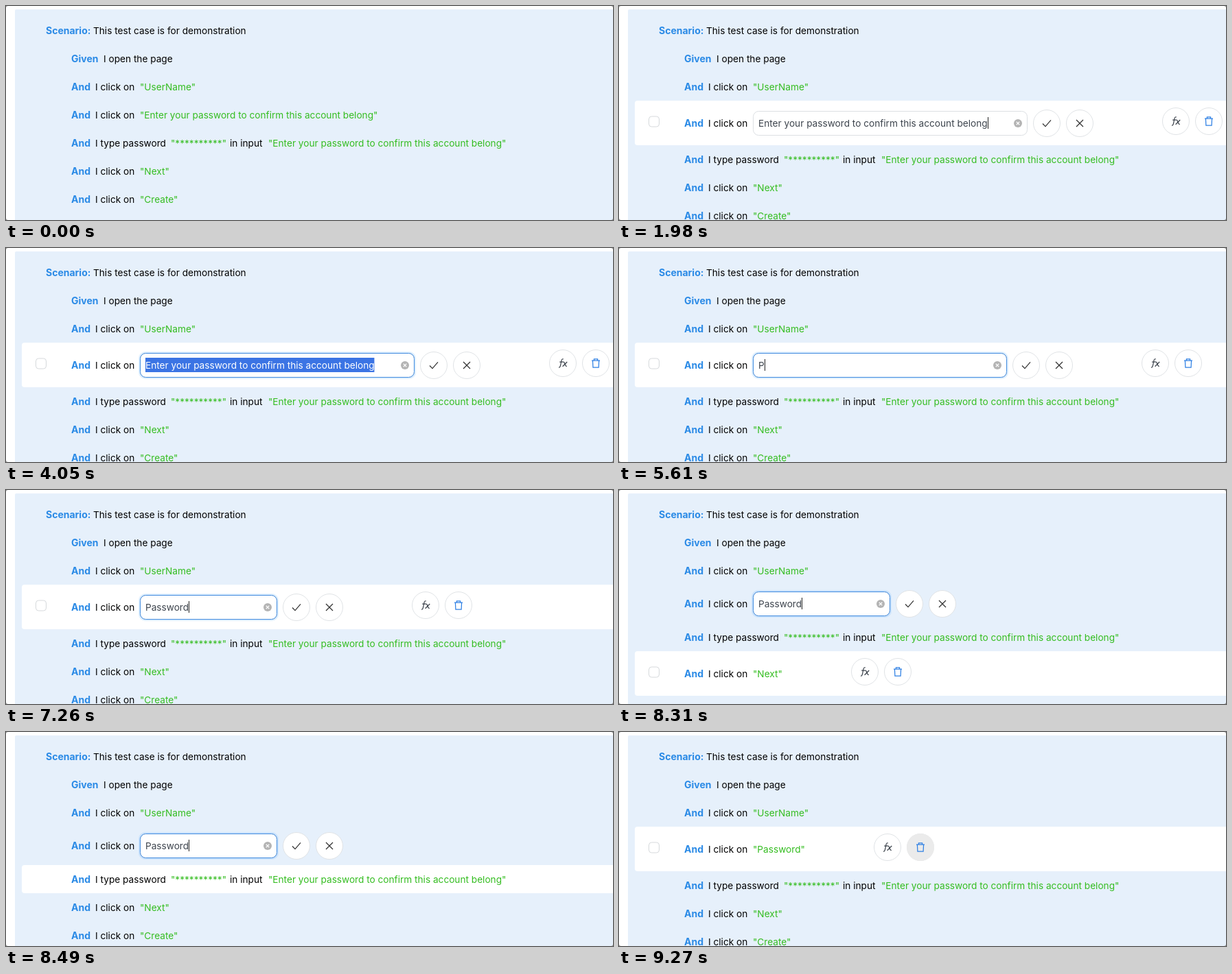
An HTML page with a canvas that plays this animation: 884x312 px, repeating every 9.36 s.

```html
<!DOCTYPE html>
<html lang="en">
<head>
<meta charset="utf-8">
<title>Editing a test step</title>
<style>
  html, body { margin: 0; width: 100%; height: 100%; overflow: hidden; background: #fff; }
  canvas { display: block; }
</style>
</head>
<body>
<canvas id="stage" width="884" height="312"></canvas>
<script>
const W = 884, H = 312, LOOP = 9360, TICK = 30;
const ctx = document.getElementById('stage').getContext('2d');

const REGULAR = '400 13.65px Inter, sans-serif';
const BOLD = '700 14px Inter, sans-serif';
const BLUE = '#2a8ae6', GREEN = '#34bd20', INK = '#3d444d', LINE = '#e0e3e6';
const LONG = 'Enter your password to confirm this account belong';
const ROW_TOP = 56, ROW_H = 41, EDIT_H = 56, TALL_H = 65;

// Each step: keyword, then pairs of x and text; quoted text is green.
const rows = [
  ['Given', [142, 'I open the page']],
  ['And', [130, 'I click on'], [195, '"UserName"']],
  ['And', [130, 'I click on'], [195, `"${LONG}"`]],
  ['And', [130, 'I type password'], [240, '"**********"'], [326, 'in input'], [382, `"${LONG}"`]],
  ['And', [130, 'I click on'], [195, '"Next"']],
  ['And', [130, 'I click on'], [195, '"Create"']],
];
const EDIT_ROW = 2;

const EDIT_START = 1980, BLUR = 8790, EDIT_END = 8970;
// [time, hovered row, expanded with its buttons]
const hovers = [
  [0, -1, false], [840, 2, false], [870, 2, true],
  [8190, 3, false], [8220, 3, true], [8280, 4, false], [8310, 4, true],
  [8490, 3, false], [8520, 3, true], [8580, 2, false], [8610, 2, true],
  [EDIT_END, 2, false], [EDIT_END + TICK, 2, true],
];
// [time, first selected character]
const selections = [
  [0, 50], [3150, 48], [3180, 44], [3210, 39], [3240, 33], [3270, 27],
  [3300, 22], [3330, 20], [3360, 19],
];
const keyTimes = [5610, 5880, 6300, 6420, 6630, 6840, 7080, 7260];

const icons = {
  check: 'M-6 .5L-2 4.6L6 -4.6',
  cross: 'M-5 -5L5 5M5 -5L-5 5',
  fx: 'M-6 6C-4 6.6 -3.6 4 -3 1L-2.2 -3.2C-1.7 -6 -.6 -6.6 .8 -6M-4.8 -2H.8' +
      'M.8 -1.8C3 -2.6 3.2 5.4 5.8 4.4M6.2 -2L-.4 4.8',
  trash: 'M-6 -4H6M-2.6 -4V-6.2H2.6V-4M-4.6 -4L-4.1 6H4.1L4.6 -4',
};
for (const name in icons) icons[name] = new Path2D(icons[name]);

const progress = (t, from, to) => Math.min(1, Math.max(0, (t - from) / (to - from)));
const smooth = p => p * p * (3 - 2 * p);
const latest = (list, t) => list.filter(entry => entry[0] <= t).pop();

function text(str, x, y, color, font = REGULAR) {
  ctx.font = font;
  ctx.fillStyle = color;
  ctx.fillText(str, x, y + 5);
}

function textWidth(str) {
  ctx.font = REGULAR;
  return ctx.measureText(str).width;
}

function box(x, y, w, h, radius, fill, stroke, lineWidth = 1) {
  ctx.beginPath();
  ctx.roundRect(x, y, w, h, radius);
  if (fill) { ctx.fillStyle = fill; ctx.fill(); }
  if (stroke) { ctx.strokeStyle = stroke; ctx.lineWidth = lineWidth; ctx.stroke(); }
}

function icon(name, x, y, color, lineWidth = 1.25) {
  ctx.save();
  ctx.translate(x, y);
  ctx.strokeStyle = color;
  ctx.lineWidth = lineWidth;
  ctx.stroke(icons[name]);
  ctx.restore();
}

function roundButton(name, x, y, color, grey = 0) {
  box(x - 19.5, y - 19.5, 39, 39, 19.5, '#fff', LINE);
  if (grey) box(x - 20, y - 20, 40, 40, 20, `rgba(235, 235, 235, ${grey})`);
  icon(name, x, y, color);
}

function typedText(t) {
  const count = keyTimes.filter(k => k <= t).length;
  return count ? 'Password'.slice(0, count) : LONG;
}

function selectionStart(t) {
  if (t >= keyTimes[0]) return LONG.length;
  if (t >= 3540) return Math.round(18 * (1 - smooth(progress(t, 3540, 4080))));
  return latest(selections, t)[1];
}

function caretVisible(t) {
  const lastInput = [EDIT_START, ...keyTimes].filter(k => k <= t).pop();
  return t < BLUR && Math.floor((t - lastInput) / 450) % 2 === 0;
}

// Draws the input with its two buttons and returns the right edge.
function drawEditor(t, y) {
  const x = 195, textX = 203;
  const width = Math.round(400 - 200 * smooth(progress(t, 5581, 5700)));
  const focus = progress(t, EDIT_START, 2250) * (1 - progress(t, BLUR, EDIT_END));
  const right = x + width, value = typedText(t), start = selectionStart(t);

  if (focus) box(x, y - 18, width, 36, 8, null, `rgba(24, 144, 255, ${.14 * focus})`, 4);
  box(x + .5, y - 17.5, width - 1, 35, 8, '#fff', '#dcdfe3');
  if (focus) box(x + .5, y - 17.5, width - 1, 35, 8, null, `rgba(64, 138, 222, ${focus})`);

  text(value, textX, y, INK);
  const end = textX + textWidth(value);
  if (start < value.length) {
    const left = textX + textWidth(value.slice(0, start));
    ctx.save();
    ctx.beginPath();
    ctx.rect(left, y - 11, end - left, 21);
    ctx.clip();
    ctx.fillStyle = '#3b74e4';
    ctx.fill();
    text(value, textX, y, '#fff');
    ctx.restore();
  } else if (caretVisible(t)) {
    ctx.fillStyle = '#222';
    ctx.fillRect(Math.round(end), y - 9, 1, 17);
  }

  box(right - 20, y - 6, 12, 12, 6, '#b4b4b4');
  ctx.save();
  ctx.translate(right - 14, y);
  ctx.scale(.45, .45);
  icon('cross', 0, 0, '#fff', 2.4);
  ctx.restore();

  roundButton('check', right + 28, y, '#333', progress(t, 8520, 8610));
  roundButton('cross', right + 76, y, '#333');
  return right + 96;
}

function drawRow(index, top, height, hovered, tall, editing, t) {
  const y = Math.round(top + height / 2);
  if (hovered) box(23, top, W, height, 4, '#fff');

  const [keyword, ...parts] = rows[index];
  text(keyword, 95, y, BLUE, BOLD);
  let right = 0;
  for (const [x, str] of parts) {
    const quoted = str[0] === '"';
    if (quoted && editing) {
      right = drawEditor(t, y);
    } else {
      const shown = quoted && index === EDIT_ROW && t >= EDIT_END ? '"Password"' : str;
      text(shown, x, y, quoted ? GREEN : '#000');
      right = Math.round(x + textWidth(shown));
    }
  }

  if (tall) {
    const trashGrey = index === EDIT_ROW ? progress(t, EDIT_END, 9270) : 0;
    box(43.5, top + 23, 15, 15, 4, '#fff', '#d6d9dc');
    roundButton('fx', right + 120, top + 30, INK);
    roundButton('trash', right + 168, top + 30, '#2f80e4', trashGrey);
  }
}

function drawCorners() {
  ctx.fillStyle = '#8a8a8a';
  ctx.beginPath();
  ctx.rect(0, 0, W, H);
  ctx.roundRect(0, 0, W, H, 3);
  ctx.fill('evenodd');
}

function draw(t) {
  const [, hoverRow, expanded] = latest(hovers, t);
  const inEdit = t >= EDIT_START && t < EDIT_END;

  ctx.fillStyle = '#fff';
  ctx.fillRect(0, 0, W, H);
  box(13, 5, W, H, 2, '#e6f0fb');
  text('Scenario:', 58, 36, BLUE, BOLD);
  text('This test case is for demonstration', 127, 36, '#000');

  let top = ROW_TOP;
  rows.forEach((_, i) => {
    const hovered = i === hoverRow, tall = hovered && expanded;
    const editing = inEdit && i === EDIT_ROW;
    const height = tall ? TALL_H : editing ? EDIT_H : ROW_H;
    drawRow(i, top, height, hovered, tall, editing, t);
    top += height;
  });
  drawCorners();
}

function frame() {
  const t = performance.now() % LOOP;
  draw(Math.floor(t / TICK) * TICK);
  requestAnimationFrame(frame);
}
frame();
</script>
</body>
</html>
```
